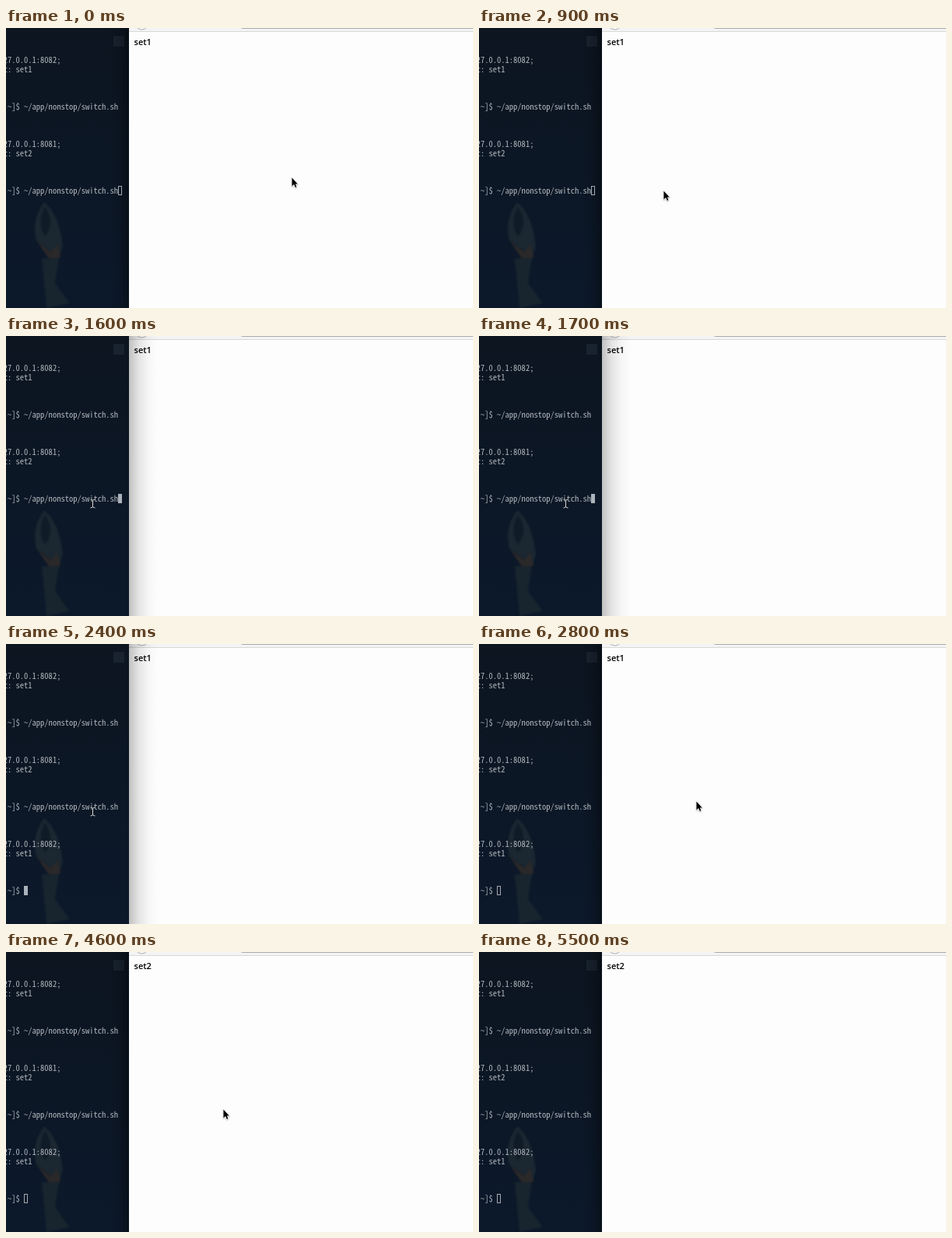
Write an HTML page with a canvas that moves like this. It is 600 px wide and 360 px high and loops after 5.7 s.

```html
<!DOCTYPE html>
<html lang="en">
<head>
<meta charset="utf-8">
<title>Switch</title>
<style>
  html, body { margin: 0; width: 100%; height: 100%; overflow: hidden; background: #fdfdfd; }
  canvas { display: block; }
</style>
</head>
<body>
<canvas id="stage" width="600" height="360"></canvas>
<script>
const ctx = document.getElementById('stage').getContext('2d');
const LOOP = 5700, STEP = 100;
const FOCUS = 1600, OUTPUT = 2300, BLUR = 2800, RELOAD = 3000, POINTER_GONE = 5100;
const EDGE = 158, CELL = 5.27, LEFT = -3.3, LINE = 12;

// Pointer resting places and the glides between them.
const start = { x: 367, y: 192 }, prompt = { x: 112, y: 208 }, page = { x: 279, y: 202 }, away = { x: 447, y: 40 };
const glides = [
  { begin: 700, end: 1500, from: start, to: prompt, dip: 18, overshoot: 1 },
  { begin: 2400, end: 2800, from: prompt, to: page, dip: 0, overshoot: 0 },
  { begin: 4900, end: 5100, from: page, to: away, dip: 0, overshoot: 0 }
];

// Pick the size that gives the terminal's column pitch.
const monoFamily = '"Noto Sans Mono CJK JP", "Noto Sans Mono", monospace';
ctx.font = `100px ${monoFamily}`;
const monoFont = `${100 * CELL / ctx.measureText('0').width}px ${monoFamily}`;

const smooth = p => p * p * (3 - 2 * p);
const easeBack = (p, c) => 1 + (c + 1) * (p - 1) ** 3 + c * (p - 1) ** 2;

function pointerAt(t) {
  const { begin, end, from, to, dip, overshoot } = glides.findLast(g => t >= g.begin) ?? glides[0];
  const p = Math.min(1, Math.max(0, (t - begin) / (end - begin)));
  const reach = overshoot ? easeBack(smooth(p), overshoot) : smooth(p);
  return {
    x: Math.round(from.x + (to.x - from.x) * reach),
    y: Math.round(from.y + (to.y - from.y) * p + dip * Math.sin(Math.PI * p))
  };
}

function rect(fill, x, y, w, h) {
  ctx.fillStyle = fill;
  ctx.fillRect(x, y, w, h);
}

function fade(x, width, ...alphas) {
  const g = ctx.createLinearGradient(x, 0, x + width, 0);
  alphas.forEach((a, i) => g.addColorStop(i / (alphas.length - 1), `rgba(0,0,0,${a})`));
  rect(g, x, 0, width, 360);
}

function shape(fill, path) {
  ctx.fillStyle = fill;
  ctx.fill(new Path2D(path));
}

function wallpaper() {
  const sky = ctx.createLinearGradient(0, 0, 0, 360);
  sky.addColorStop(0, '#0c1520');
  sky.addColorStop(1, '#0c192b');
  rect(sky, 0, 0, EDGE, 360);
  rect('#18232f', 138, 10, 14, 14);
  ctx.save();
  ctx.filter = 'blur(1px)';
  shape('#1b2731', 'M49 224Q68 238 73 280L68 296L39 274Q32 246 49 224');
  shape('#101b28', 'M50 230Q64 250 50 268Q39 250 50 230');
  shape('#2b2829', 'M40 274L60 304L70 294L66 278L58 288Z');
  shape('#18252f', 'M46 296L68 296L63 328L82 354L52 360Z');
  ctx.restore();
}

function terminal(focused, hasOutput) {
  wallpaper();
  if (!focused) fade(132, EDGE - 132, 0, .12, .35);

  const print = (text, y) => ctx.fillText(text, LEFT, y);
  const command = y => print(' ~]$ ~/app/nonstop/switch.sh', y);
  const result = (port, set, y) => {
    print(`27.0.0.1:${port};`, y);
    print(`t: ${set}`, y + LINE);
  };
  ctx.font = monoFont;
  ctx.fillStyle = '#b2b8be';
  result(8082, 'set1', 44.5);
  command(104.5);
  result(8081, 'set2', 152.5);
  command(212.5);
  if (hasOutput) {
    result(8082, 'set1', 260.5);
    print(' ~]$', 320.5);
  }

  const [x, y] = hasOutput ? [23, 311] : [144, 203];
  if (focused) {
    rect('#abb2ba', x, y, 5, LINE);
  } else {
    ctx.strokeStyle = '#a0a7af';
    ctx.lineWidth = 1;
    ctx.strokeRect(x + .5, y + .5, 4, LINE - 1);
  }
}

function browser(focused, label) {
  rect('#fdfdfd', EDGE, 0, 600 - EDGE, 360);
  rect('#f4f4f4', EDGE, 0, 600 - EDGE, 4);
  rect('#d8d8d8', EDGE, 4, 600 - EDGE, 1);

  // Lower edges of the back button and the address bar.
  ctx.strokeStyle = '#aaa';
  ctx.fillStyle = '#fff';
  ctx.lineWidth = 1;
  ctx.beginPath();
  ctx.arc(174.5, -7, 9, 0, 7);
  ctx.roundRect(301.5, -10, 320, 10.5, 2);
  ctx.fill();
  ctx.stroke();

  if (focused) fade(EDGE, 37, .24, .1, .03, 0);
  ctx.font = '600 11px "Open Sans", "Noto Sans", sans-serif';
  ctx.fillStyle = '#000';
  ctx.fillText(label, 164.6, 22);
}

function arrow(x, y) {
  const outline = new Path2D('M0 0V11L2.6 8.7L4.4 12.6L6 11.9L4.4 8H7.4Z');
  ctx.save();
  ctx.translate(x + .4, y + .4);
  ctx.lineJoin = 'round';
  ctx.lineWidth = 1.6;
  ctx.strokeStyle = '#fff';
  ctx.shadowColor = 'rgba(0,0,0,.3)';
  ctx.shadowBlur = 1.5;
  ctx.shadowOffsetY = .7;
  ctx.stroke(outline);
  ctx.shadowColor = 'transparent';
  ctx.fillStyle = '#000';
  ctx.fill(outline);
  ctx.restore();
}

function textPointer(x, y) {
  const beam = new Path2D('M-3 2Q0 2 0 4V11Q0 13 -3 13M3 2Q0 2 0 4M0 11Q0 13 3 13');
  ctx.save();
  ctx.translate(x - .5, y);
  for (const [width, color] of [[2.2, 'rgba(0,0,0,.45)'], [1, '#dce0e4']]) {
    ctx.lineWidth = width;
    ctx.strokeStyle = color;
    ctx.stroke(beam);
  }
  ctx.restore();
}

function draw(t) {
  const focused = t >= FOCUS && t < BLUR;
  terminal(focused, t >= OUTPUT);
  browser(focused, t < RELOAD ? 'set1' : 'set2');
  if (t < POINTER_GONE) {
    const { x, y } = pointerAt(t);
    (focused && x < EDGE ? textPointer : arrow)(x, y);
  }
}

const startTime = performance.now();
function tick() {
  const t = (performance.now() - startTime) % LOOP;
  draw(Math.floor(t / STEP) * STEP);
  requestAnimationFrame(tick);
}
tick();
</script>
</body>
</html>
```
